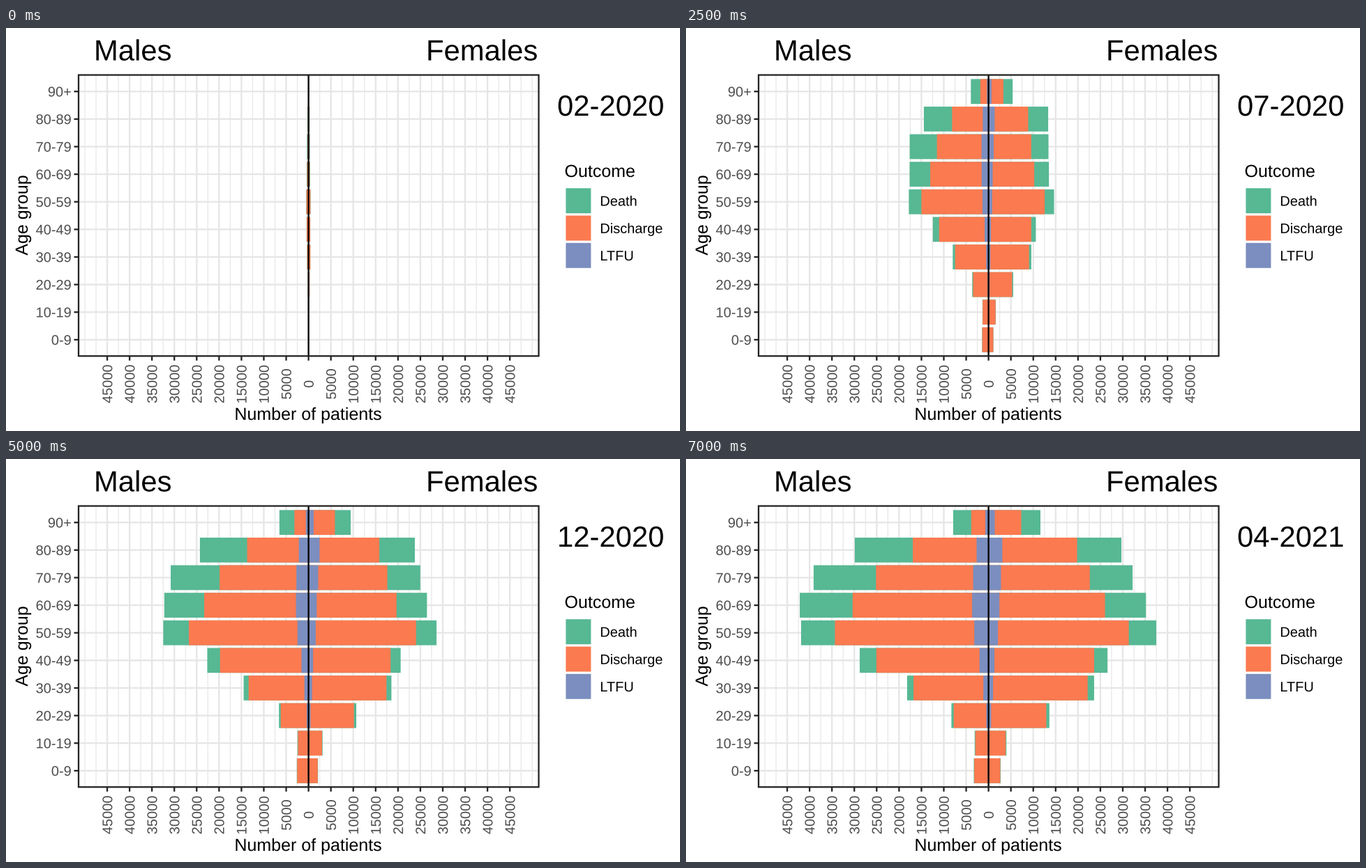
Animation of 966x579 px, one loop 7.5 s. Source, as a matplotlib script:

```python
import numpy as np
import matplotlib.pyplot as plt
from matplotlib.animation import FuncAnimation
from matplotlib.patches import PathPatch, Rectangle
from matplotlib.textpath import TextPath
from matplotlib.transforms import Affine2D

plt.rcParams.update({"font.family": "Liberation Sans", "path.snap": False})

W, H, DPI = 966, 579, 64
PT = 72 / DPI
MONTHS, STEP_MS = 15, 500

GREEN, ORANGE, BLUE = "#57B894", "#FB7A50", "#7B8EBF"
GRID, DARK, LABEL = "#E6E6E6", "#242424", "#4D4D4D"
LEFT, RIGHT, TOP, BOTTOM = 104, 763.5, 67.5, 471.3
X0, X_STEP = 433.6, 32.06
Y0, Y_STEP, BAR = 91.2, 39.63, 35.7
PER_THOUSAND = X_STEP / 5
AGES = ["90+"] + [f"{a}-{a + 9}" for a in range(80, -1, -10)]
ROWS = np.arange(len(AGES))

# Growth towards the final total at key months, for old, middle and young groups.
KEYS = [0, 2, 4, 7, 10, 12, 14]
EASE = [1.2, .75, .6, 1.4, .4, .6]
GROWTH_ROWS = [.5, 3, 6]
GROWTH = np.array([
    [.008, .305, .425, .503, .812, .978, 1],
    [.010, .191, .295, .466, .752, .955, 1],
    [.018, .149, .287, .515, .785, .950, 1],
])
MALE_LEAD = np.array([0, .045, .045, .025, .012, .005, 0])

# Final totals in thousands; outcome shares are given at a few rows.
SHARE_ROWS = [0, 3, 4, 6, 9]
EARLY_DEATHS = [1.1, .84, .7, .65, .6]
SIDES = [
    dict(sign=-1, curves=GROWTH + MALE_LEAD,
         total=[7.9, 29.9, 39.1, 42.2, 41.9, 28.8, 18.2, 8.3, 3.1, 3.3],
         death=[.51, .282, .183, .08, .03], ltfu=[.09, .087, .076, .064, .05]),
    dict(sign=1, curves=GROWTH,
         total=[11.6, 29.7, 32.2, 35.2, 37.5, 26.6, 23.6, 13.6, 4, 2.7],
         death=[.369, .262, .166, .062, .03], ltfu=[.121, .069, .056, .043, .04]),
]

fig = plt.figure(figsize=(W / DPI, H / DPI), dpi=DPI, facecolor="white")
ax = fig.add_axes([0, 0, 1, 1])
ax.set(xlim=(0, W), ylim=(H, 0))
ax.axis("off")


def text(x, y, s, size, color="black", ha="left", rotation=0):
    path = TextPath((0, 0), s, size=size)
    ink = path.get_extents()
    shift = {"left": 0, "center": -(ink.x0 + ink.x1) / 2, "right": -ink.x1}[ha]
    place = Affine2D().translate(shift, 0).scale(1, -1).rotate_deg(-rotation)
    path = path.transformed(place.translate(x, y))
    return ax.add_patch(PathPatch(path, fc=color, ec="none", lw=0, zorder=6))


def line(xs, ys, color, width, z):
    ax.plot(xs, ys, color=color, lw=width * PT, zorder=z, solid_capstyle="butt")


def box(x, y, w, h, color):
    return ax.add_patch(Rectangle((x, y), w, h, fc=color, ec="none", lw=0, zorder=3))


def draw_axes():
    for k in range(-20, 21):
        x = X0 + k * X_STEP / 2
        major = k % 2 == 0 and abs(k) < 20
        line([x, x], [TOP, BOTTOM], GRID, 2.3 if major else 1.15, 1.5 if major else 1)
        if major:
            line([x, x], [BOTTOM, BOTTOM + 6.5], DARK, 2.3, 5)
            text(x + 7.2, 511.5, str(abs(k) * 2500), 20, LABEL, "center", 90)
    for row, age in enumerate(AGES):
        y = Y0 + row * Y_STEP
        line([LEFT, RIGHT], [y, y], GRID, 2.3, 1.5)
        line([LEFT - 6.5, LEFT], [y, y], DARK, 2.3, 5)
        text(92.8, y + 7.2, age, 20, LABEL, "right")
    line([X0, X0], [TOP, BOTTOM], "black", 2.3, 4)
    ax.add_patch(Rectangle((LEFT, TOP), RIGHT - LEFT, BOTTOM - TOP, fill=False,
                           ec=DARK, lw=2.3 * PT, zorder=5))
    text(X0, 563, "Number of patients", 25, ha="center")
    text(31, 269.5, "Age group", 25, ha="center", rotation=90)
    text(126, 46.5, "Males", 41.8)
    text(602, 46.5, "Females", 41.8)


def draw_legend():
    text(800.5, 214, "Outcome", 25)
    for i, (name, color) in enumerate(zip(("Death", "Discharge", "LTFU"),
                                          (GREEN, ORANGE, BLUE))):
        y = 248.2 + 39.3 * i
        box(802.4, y - 18, 36, 36, color)
        text(851.3, y + 7.2, name, 20)


def growth(curves, month):
    k = min(np.searchsorted(KEYS, month, "right") - 1, len(EASE) - 1)
    part = ((month - KEYS[k]) / (KEYS[k + 1] - KEYS[k])) ** EASE[k]
    level = curves[:, k] + (curves[:, k + 1] - curves[:, k]) * part
    return np.interp(ROWS, GROWTH_ROWS, level)


def by_row(values):
    return np.interp(ROWS, SHARE_ROWS, values)


draw_axes()
draw_legend()
dates = [text(790, 126, f"{m % 12 + 1:02d}-{2020 + m // 12}", 41.8)
         for m in range(1, MONTHS + 1)]
for side in SIDES:
    # Nested bars: the shorter ones cover the inner part of the longer ones.
    side["bars"] = [[box(X0, Y0 + row * Y_STEP - BAR / 2, 0, BAR, color) for row in ROWS]
                    for color in (GREEN, ORANGE, BLUE)]


def update(month):
    late = 1 - np.exp(-max(month - 2, 0) / 3.8)
    early = by_row(EARLY_DEATHS)
    for side in SIDES:
        total = np.array(side["total"]) * PER_THOUSAND * growth(side["curves"], month)
        death = by_row(side["death"]) * (early + (1 - early) * late)
        lengths = total, total * (1 - death), total * by_row(side["ltfu"])
        for layer, widths in zip(side["bars"], lengths):
            for bar, width in zip(layer, widths):
                bar.set_width(side["sign"] * width)
    for m, label in enumerate(dates):
        label.set_visible(m == month)
    return dates


anim = FuncAnimation(fig, update, frames=MONTHS, interval=STEP_MS, repeat=True,
                     repeat_delay=0, blit=False)
plt.show()
```
